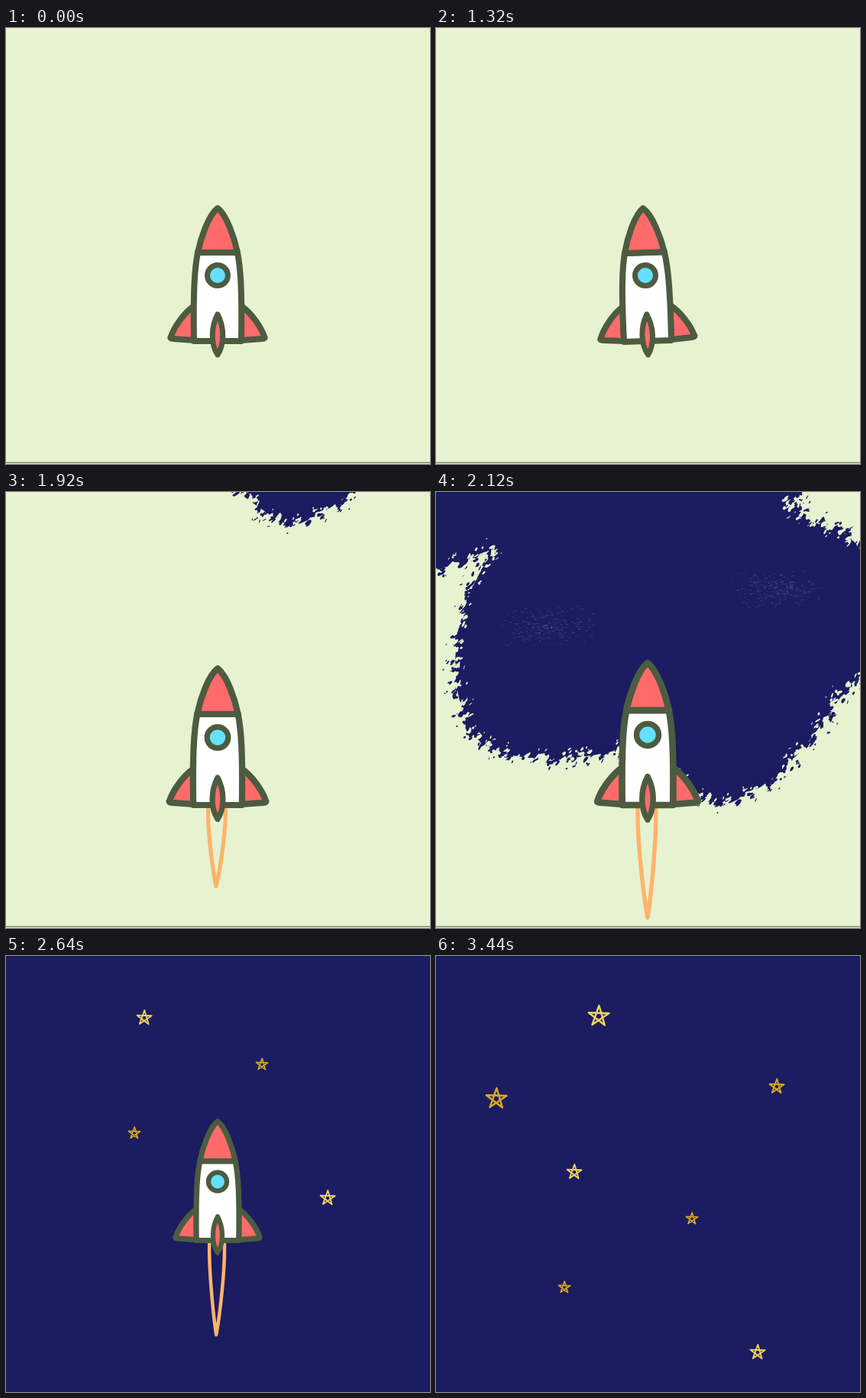
Recreate the animation shown at these times as an HTML page with a canvas. Size 555 px wide and 571 px high, loop 3840 ms.

```html
<!DOCTYPE html>
<html lang="en">
<head>
<meta charset="utf-8">
<title>Rocket launch</title>
<style>
html, body { margin: 0; width: 100%; height: 100%; overflow: hidden; background: #e7f2d0; }
canvas { display: block; width: 555px; height: 571px; }
</style>
</head>
<body>
<canvas id="stage" width="555" height="571"></canvas>
<script>
const W = 555, H = 571, LOOP = 3840;
const GREEN = '#e7f2d0', NIGHT = '#1c1c61', LINE = '#4d5b40';
const RED = '#ff6b6b', CYAN = '#66e0ff', FIRE = '#ffb36b';
const BRIGHT = '#ecd25c', DEEP = '#d8aa20';
const BASE_X = 277, BASE_Y = 410, VANISH_Y = 157;
const ctx = document.getElementById('stage').getContext('2d');

const clamp = v => Math.max(0, Math.min(1, v));
const shape = d => new Path2D(d);

let seed = 7;
function rnd() {
  seed = (seed * 16807) % 2147483647;
  return seed / 2147483647;
}
const spread = () => rnd() * 2 - 1;

// ---- painted night sky with a ragged brush edge ----
const PAD = 110, SKY_H = 570;
const EDGE = 'C530-55 500-15 458 16C485 34 540 45 555 76L585 90V220L555 240' +
  'C510 280 480 375 375 411C330 395 300 350 240 337' +
  'C200 350 75 365 45 312C20 262 8 175 76 75C50 90 20 96 0 102';

function brush(c, x, y, size) {
  c.beginPath();
  c.ellipse(x, y, size * (1.5 + rnd() * 3.5), size * (0.7 + rnd() * 1.5), -0.8 + spread() * 0.5, 0, 7);
  c.fill();
}

function fray(c) {
  const path = document.createElementNS('http://www.w3.org/2000/svg', 'path');
  path.setAttribute('d', 'M555-86' + EDGE);
  const total = path.getTotalLength();
  let clump = 0, color = NIGHT;
  for (let s = 0, i = 0; s < total; s += 0.8, i++) {
    if (i % 6 === 0) {
      clump = spread() * 6;
      color = rnd() < 0.55 ? NIGHT : GREEN;
    }
    const p = path.getPointAtLength(s), q = path.getPointAtLength(s + 1);
    const d = clump + Math.pow(spread(), 3) * 14;
    c.fillStyle = color;
    brush(c, p.x - (q.y - p.y) * d, p.y + (q.x - p.x) * d, 1.1 - Math.abs(d) / 25);
  }
}

function dryPatch(c, x, y) {
  c.fillStyle = 'rgba(150,150,180,0.25)';
  for (let i = 0; i < 220; i++) {
    c.fillRect(x + (spread() + spread()) * 32, y + (spread() + spread()) * 14, 1 + rnd() * 3, 0.9);
  }
}

function paintSky() {
  const cv = document.createElement('canvas');
  cv.width = W;
  cv.height = SKY_H;
  const c = cv.getContext('2d');
  c.translate(0, PAD);
  c.fillStyle = NIGHT;
  c.fill(shape('M0-110H555V-86' + EDGE + 'Z'));
  fray(c);
  dryPatch(c, 445, 128);
  dryPatch(c, 145, 175);
  return cv;
}
const sky = paintSky();

// distance the scenery still has to scroll
const left = n => n >= 53 ? 0 : 202 * Math.pow((53 - n) / 9, 2.18);

function drawSky(n) {
  const top = Math.round(left(35) - left(n) - PAD);
  ctx.fillStyle = NIGHT;
  ctx.fillRect(0, 0, W, Math.max(0, top + 1));
  ctx.drawImage(sky, 0, top);
}

// ---- stars: x, y, radius, colour ----
const stars = [
  [213, 79, 14, BRIGHT], [181, 283, 10, BRIGHT], [421, 519, 10, BRIGHT],
  [79, 187, 14, DEEP], [446, 171, 10, DEEP], [335, 344, 8, DEEP], [168, 434, 8, DEEP]
];

function drawStars(n) {
  for (const [x, y, r, color] of stars) {
    ctx.beginPath();
    for (let i = 0; i < 5; i++) {
      const a = -Math.PI / 2 + 0.03 + i * Math.PI * 0.8;
      ctx.lineTo(x + Math.cos(a) * r, y - left(n) + Math.sin(a) * r);
    }
    ctx.closePath();
    ctx.strokeStyle = color;
    ctx.lineWidth = 0.6 + r * 0.13;
    ctx.stroke();
  }
}

// ---- rocket, origin at the middle of its base ----
const nose = shape('M0-174C-12-165-22-135-26-116L26-116C22-135 12-165 0-174Z');
const body = shape('M-26-116C-30-95-32-70-31 0L31 0C32-70 30-95 26-116Z');
const fin = shape('M-31-46C-45-36-57-18-61-6Q-63-3-58-3L-31-1Z');
const keel = shape('M0-35C-9-18-9 4 0 18C9 4 9-18 0-35Z');
const pane = shape('M-13.5-86a13.5 13.5 0 1 0 27 0a13.5 13.5 0 1 0-27 0Z');

function part(path, fill) {
  ctx.fillStyle = fill;
  ctx.fill(path);
  ctx.stroke(path);
}

function longFlame(n) {
  const k = clamp((n - 29) / 4);
  const sway = 2 * Math.sin((n + 1) * Math.PI / 2) * -1;
  ctx.strokeStyle = FIRE;
  ctx.lineWidth = 5;
  ctx.beginPath();
  ctx.moveTo(-12, 3);
  ctx.bezierCurveTo(-13, 40 * k, -6 + sway / 2, 105 * k, sway, 138 * k);
  ctx.bezierCurveTo(5 + sway / 2, 105 * k, 11, 40 * k, 10, 3);
  ctx.stroke();
}

function smallFlame(n, k) {
  const at = i => {
    const a = Math.PI * (1 - i / 14), r = (i + n) % 2 ? 0.8 : 1.08;
    return [BASE_X - 1 + 35 * r * Math.cos(a), 412 + 21 * k * r * Math.sin(a)];
  };
  ctx.strokeStyle = FIRE;
  ctx.lineWidth = 4.6;
  ctx.beginPath();
  ctx.moveTo(...at(0));
  for (let i = 1; i < 14; i++) {
    const [x, y] = at(i), [u, v] = at(i + 1);
    ctx.quadraticCurveTo(x, y, (x + u) / 2, (y + v) / 2);
  }
  ctx.lineTo(...at(14));
  ctx.stroke();
}

function drawRocket(n) {
  const far = 1 - Math.pow(clamp((n - 39) / 15), 1.65);
  if (far <= 0) return;
  const crouch = Math.sin(Math.PI * clamp((n - 24) / 8));
  const grow = 1 + 0.07 * clamp((n - 30) / 5);
  const size = grow * far;
  const tilt = n >= 16 && n < 24 ? (n % 2 ? 2 : -2) : 0;

  if (n >= 26 && n <= 30) smallFlame(n, crouch);
  ctx.save();
  ctx.translate(BASE_X, VANISH_Y + (BASE_Y - VANISH_Y) * Math.pow(far, 0.9));
  ctx.scale(size * (1 + 0.24 * crouch), size * (1 - 0.35 * crouch));
  ctx.rotate(tilt * Math.PI / 180);
  if (n > 30) longFlame(n);
  ctx.strokeStyle = LINE;
  ctx.lineWidth = 8;
  part(fin, RED);
  ctx.scale(-1, 1);
  part(fin, RED);
  part(body, '#fff');
  part(nose, RED);
  ctx.lineWidth = 7;
  part(pane, CYAN);
  part(keel, RED);
  ctx.restore();
}

function drawGlint(r) {
  ctx.strokeStyle = BRIGHT;
  ctx.lineWidth = 2.5;
  ctx.beginPath();
  for (let i = 0; i < 8; i++) {
    const x = Math.cos(i * Math.PI / 4) * r, y = Math.sin(i * Math.PI / 4) * r;
    const out = i % 2 ? 0.6 : 1;
    ctx.moveTo(278 + x * 0.3, VANISH_Y + y * 0.3);
    ctx.lineTo(278 + x * out, VANISH_Y + y * out);
  }
  ctx.stroke();
}

// steps last 80 and 40 ms in turn
function stepAt(t) {
  if (t < 960) return 0;
  return Math.min(57, Math.floor(t / 120) * 2 + (t % 120 >= 80 ? 1 : 0));
}

function draw(n) {
  ctx.lineJoin = ctx.lineCap = 'round';
  ctx.fillStyle = GREEN;
  ctx.fillRect(0, 0, W, H);
  if (n >= 31) drawSky(n);
  if (n >= 39) drawStars(n);
  if (n < 42) {
    ctx.fillStyle = 'rgba(98,108,100,0.8)';
    ctx.fillRect(0, 568.5, W, 1.5);
    ctx.fillStyle = GREEN;
    ctx.fillRect(0, 570, W, 1);
  }
  drawRocket(n);
  if (n === 55 || n === 56) drawGlint(22 + 12 * (n - 55));
}

const start = performance.now();
let last = -1;
function tick() {
  const n = stepAt((performance.now() - start) % LOOP);
  if (n !== last) draw(last = n);
  requestAnimationFrame(tick);
}
tick();
</script>
</body>
</html>
```
